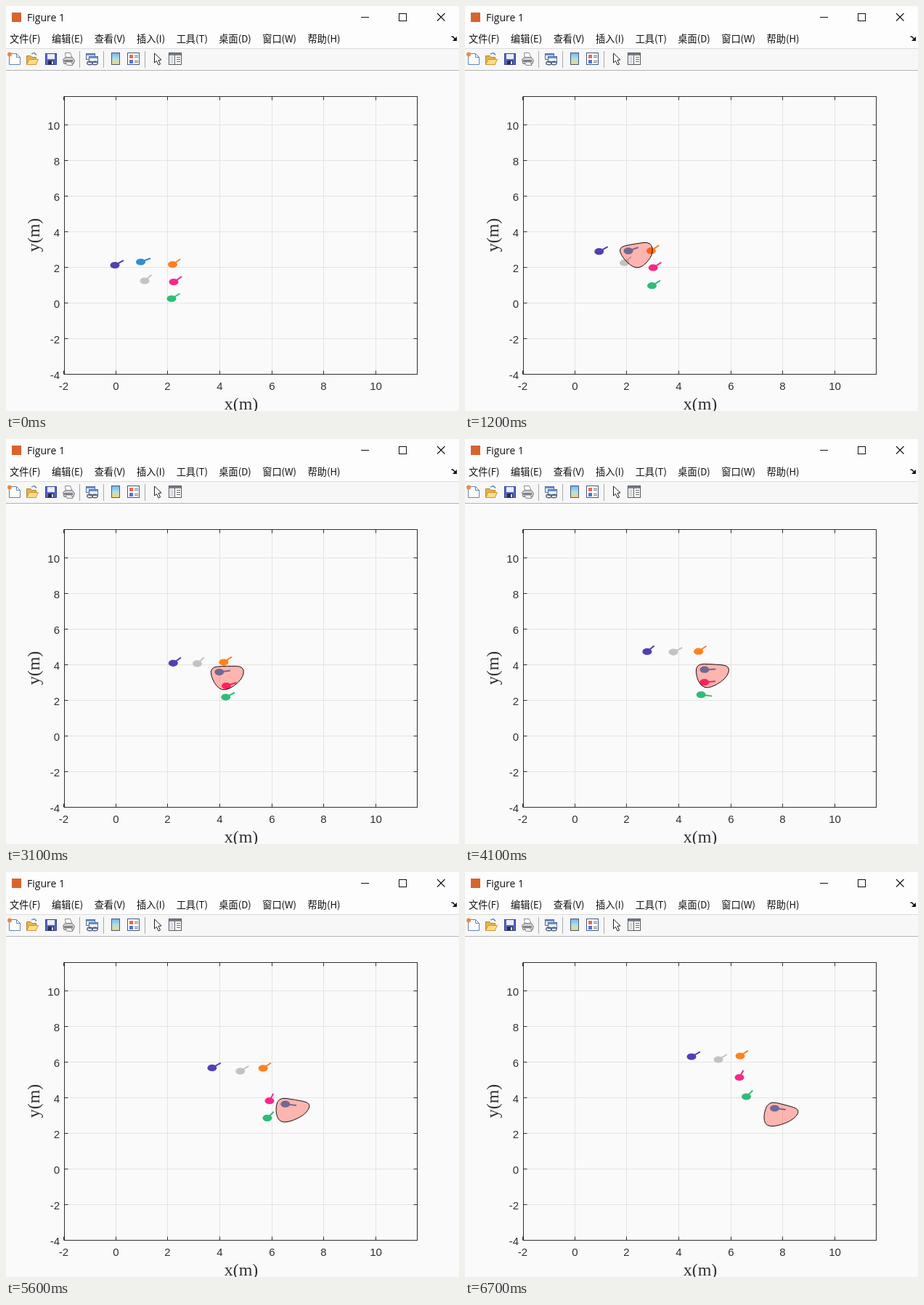
These frames come from a looping animation (624 by 557 pixels, 6850 ms). An HTML page with a canvas:

```html
<!DOCTYPE html>
<html lang="zh-CN">
<head>
<meta charset="utf-8">
<title>Figure 1</title>
<style>
html, body { margin: 0; width: 100%; height: 100%; overflow: hidden; background: #fafafa; }
canvas { display: block; }
</style>
</head>
<body>
<canvas id="stage" width="624" height="557"></canvas>
<script>
const ctx = document.getElementById('stage').getContext('2d');
const LOOP = 6850, LAST = 6700, STEP = 50;
const SX = 35.8, SY = 24.5; // pixels per metre
const INK = '#303030';

// Evenly timed way points; headings follow the direction of travel
const robot = (color, ...path) => ({ color, path });
const blue = robot('#348cd2', [185.5, 352], [241.3, 331.7], [303, 319.4], [363.3, 317.2], [426.5, 325]);
const robots = [
  robot('#5040b0', [150, 356.5], [197.5, 330.3], [235.7, 304.4], [270, 277.8], [312, 254]),
  blue,
  robot('#c3c3c3', [191, 378], [230.7, 343], [269.3, 304], [309, 282], [349, 258]),
  robot('#ff8020', [229.5, 355.5], [267.1, 329.2], [305.5, 303.3], [341.3, 278.6], [379, 253]),
  robot('#f82888', [231, 379.5], [270.3, 353.3], [309.5, 337.6], [353, 327.5], [378, 282.5]),
  robot('#30bc78', [228, 402.5], [269, 377.6], [308.5, 352.5], [346, 349.5], [387.5, 309])
];
const zone = [[-13, -8], [12, -7.5], [36, -5.5], [30, 13], [3, 28], [-10, 16]];

function rect(x, y, w, h, fill, stroke) {
  if (fill) { ctx.fillStyle = fill; ctx.fillRect(x, y, w, h); }
  if (stroke) { ctx.strokeStyle = stroke; ctx.lineWidth = 1; ctx.strokeRect(x + .5, y + .5, w - 1, h - 1); }
}
function line(color, width, ...pts) {
  ctx.beginPath();
  for (let i = 0; i < pts.length; i += 2) ctx.lineTo(pts[i], pts[i + 1]);
  ctx.strokeStyle = color; ctx.lineWidth = width; ctx.stroke();
}
function poly(fill, stroke, ...pts) {
  ctx.beginPath();
  for (let i = 0; i < pts.length; i += 2) ctx.lineTo(pts[i], pts[i + 1]);
  ctx.closePath();
  ctx.fillStyle = fill; ctx.fill();
  if (stroke) { ctx.strokeStyle = stroke; ctx.lineWidth = 1; ctx.stroke(); }
}
function ellipse(x, y, rx, ry, fill) {
  ctx.beginPath();
  ctx.ellipse(x, y, rx, ry, 0, 0, 7);
  ctx.fillStyle = fill; ctx.fill();
}
function text(str, x, y, font, align = 'left', color = '#111') {
  ctx.font = font; ctx.textAlign = align; ctx.fillStyle = color;
  ctx.fillText(str, x, y);
}

function drawTitleBar() {
  rect(0, 0, 624, 58, '#fdfdfd');
  rect(8, 9, 13, 13, '#d8642c');
  text('Figure 1', 29, 20.5, '14px "Open Sans", "Noto Sans", sans-serif');
  line('#111', 1, 489, 15.5, 500, 15.5);
  rect(541, 10, 11, 11, null, '#111');
  line('#111', 1.1, 594, 10, 604.5, 20.5);
  line('#111', 1.1, 604.5, 10, 594, 20.5);

  let x = 5;
  for (const name of '文件(F) 编辑(E) 查看(V) 插入(I) 工具(T) 桌面(D) 窗口(W) 帮助(H)'.split(' ')) {
    text(name, x, 50, '13.2px "Noto Sans CJK SC", "Noto Sans CJK", sans-serif');
    x += ctx.measureText(name).width + 15.5;
  }
  line('#111', 1.4, 613.5, 42, 616, 42.5, 618.5, 45.5);
  poly('#111', null, 621, 42, 621, 48, 615, 48);
}

function drawToolbar() {
  rect(0, 58, 624, 30, '#f7f7f7');
  line('#dcdcdc', 1, 0, 58.5, 624, 58.5);
  line('#b4b4b4', 1, 0, 88.5, 624, 88.5);
  for (const x of [101, 134, 191]) line('#a8a8a8', 1, x + .5, 62, x + .5, 85);

  // New document
  poly('#fff', '#6483ac', 4.5, 65.5, 14.5, 65.5, 19.5, 70.5, 19.5, 80.5, 4.5, 80.5);
  line('#6483ac', 1, 14.5, 65.5, 14.5, 70.5, 19.5, 70.5);
  ellipse(5, 66.5, 3, 3, '#e8894a');

  // Open folder
  poly('#e8b04c', '#b9852c', 28.5, 80.5, 28.5, 68.5, 34, 68.5, 36, 70.5, 41.5, 70.5, 41.5, 80.5);
  poly('#ffdd83', '#c8953a', 28.5, 80.5, 32, 73.5, 44.5, 73.5, 41, 80.5);
  line('#4d78ad', 1.3, 35, 66, 39, 64.5, 42, 67.5);

  // Save
  rect(54, 65, 16, 16, '#5865bd', '#374195');
  rect(57, 66, 10, 7, '#e8eefa');
  rect(58, 75, 8, 6, '#242c5c');
  rect(63, 76, 2, 4, '#e2e6f4');

  // Print
  poly('#fff', '#888', 82.5, 72, 81.5, 64.5, 88.5, 64.5, 91.5, 72);
  poly('#c9cbd0', '#74777e', 78.5, 73.5, 82, 70.5, 91, 70.5, 94.5, 74.5, 93, 79.5, 80, 79.5);
  line('#555', 1.5, 80, 75.5, 92, 75.5);
  poly('#f4f4f4', '#888', 82, 77, 90, 77, 92, 81.5, 84, 81.5);

  // Linked plots
  for (const d of [0, 4]) {
    rect(110 + d, 65 + d, 13, 9, '#eef4fb', '#4d6c9c');
    rect(111 + d, 66 + d, 11, 2, '#6e95cb');
  }
  ctx.strokeStyle = '#52617c'; ctx.lineWidth = 1.4;
  for (const x of [115.5, 122.5]) {
    ctx.beginPath(); ctx.ellipse(x, 78.5, 3.8, 2.3, 0, 0, 7); ctx.stroke();
  }

  // Colour bar
  const bar = ctx.createLinearGradient(0, 65, 0, 80);
  ['#76b5ee', '#aee0e0', '#f8d878'].forEach((c, i) => bar.addColorStop(i / 2, c));
  rect(145, 64, 12, 17, bar, '#40597f');

  // Legend
  rect(167, 64, 17, 17, '#fff', '#40597f');
  ['#e36d54', '#5674cc'].forEach((c, i) => {
    const y = 67 + 7 * i;
    rect(170, y, 5, 5, c);
    for (const d of [1.5, 3.5]) line('#777', 1, 177, y + d, 182, y + d);
  });

  // Pointer
  poly('#fff', '#222', 204.5, 65, 204.5, 78, 207.5, 75.5, 210, 81, 212.5, 80, 210, 74.5, 214, 74);

  // Side panel
  rect(224, 64, 18, 17, '#fff', '#53565c');
  rect(225, 65, 16, 3, '#777d87');
  rect(226, 69, 5, 10, '#d9dce2');
  line('#53565c', 1, 232.5, 68, 232.5, 80);
  for (let y = 70.5; y < 78; y += 3) line('#666', 1, 235, y, 240, y);
}

function drawAxes() {
  const left = 80.5, right = 566.5, top = 124.5, bottom = 506.5;
  const font = '15px "Liberation Sans", Arial, sans-serif';
  const px = v => Math.round(150.8 + v * SX) + .5;
  const py = v => Math.floor(408.5 - v * SY) + .5;
  for (let v = -2; v <= 10; v += 2) {
    if (v > -2) line('#e4e4e4', 1, px(v), top, px(v), bottom);
    line('#e4e4e4', 1, left, py(v), right, py(v));
  }
  for (let v = -4; v <= 10; v += 2) {
    const x = px(v), y = py(v);
    if (v > -4) {
      line(INK, 1, x, bottom, x, bottom - 5);
      line(INK, 1, x, top, x, top + 5);
      text(v, x, 528, font, 'center', INK);
    }
    line(INK, 1, left, y, left + 5, y);
    line(INK, 1, right, y, right - 5, y);
    text(v, 74, y + 6, font, 'right', INK);
  }
  rect(80, 124, 487, 383, '#0000', INK);

  const labelFont = '24px "Liberation Serif", "Times New Roman", serif';
  text('x(m)', 324, 555, labelFont, 'center', INK);
  ctx.save();
  ctx.translate(46, 315);
  ctx.rotate(-Math.PI / 2);
  text('y(m)', 0, 0, labelFont, 'center', INK);
  ctx.restore();
}

// Catmull-Rom curve through evenly timed points, u from 0 to 1
function along(path, u) {
  const n = path.length - 1;
  const i = Math.min(Math.floor(u * n), n - 1), s = u * n - i;
  return [0, 1].map(k => {
    const b = path[i][k], c = path[i + 1][k];
    const a = i > 0 ? path[i - 1][k] : 2 * b - c;
    const d = i < n - 1 ? path[i + 2][k] : 2 * c - b;
    return b + s / 2 * (c - a + s * (2 * a - 5 * b + 4 * c - d + s * (3 * (b - c) + d - a)));
  });
}

function drawRobot({ color, path }, u) {
  const [x, y] = along(path, u), [x2, y2] = along(path, u + .001);
  const a = Math.atan2((y - y2) / SY, (x2 - x) / SX);
  line(color, 2, x, y, x + .43 * SX * Math.cos(a), y - .43 * SY * Math.sin(a));
  ellipse(x, y, 6.5, 4.6, color);
}

// The zone rides on the blue robot and turns steadily, in metric space
function drawZone(u) {
  const mid = (p, q) => [(p[0] + q[0]) / 2, (p[1] + q[1]) / 2];
  ctx.save();
  ctx.translate(...along(blue.path, u));
  ctx.scale(SX, -SY);
  ctx.rotate((26 - 43 * u) * Math.PI / 180);
  ctx.scale(1 / SX, -1 / SY);
  ctx.beginPath();
  ctx.moveTo(...mid(zone.at(-1), zone[0]));
  zone.forEach((p, i) => ctx.quadraticCurveTo(...p, ...mid(p, zone[(i + 1) % zone.length])));
  ctx.closePath();
  ctx.restore();
  ctx.fillStyle = 'rgba(255, 20, 0, .3)';
  ctx.fill();
  ctx.strokeStyle = '#1c1010';
  ctx.lineWidth = 1;
  ctx.stroke();
}

const start = performance.now();
function draw() {
  const now = Math.max(0, performance.now() - start) % LOOP;
  const u = Math.min(LAST, Math.floor(now / STEP) * STEP) / LAST;
  rect(0, 0, 624, 557, '#fafafa');
  drawTitleBar();
  drawToolbar();
  drawAxes();
  for (const r of robots) drawRobot(r, u);
  if (u > 0) drawZone(u);
  requestAnimationFrame(draw);
}
draw();
</script>
</body>
</html>
```
